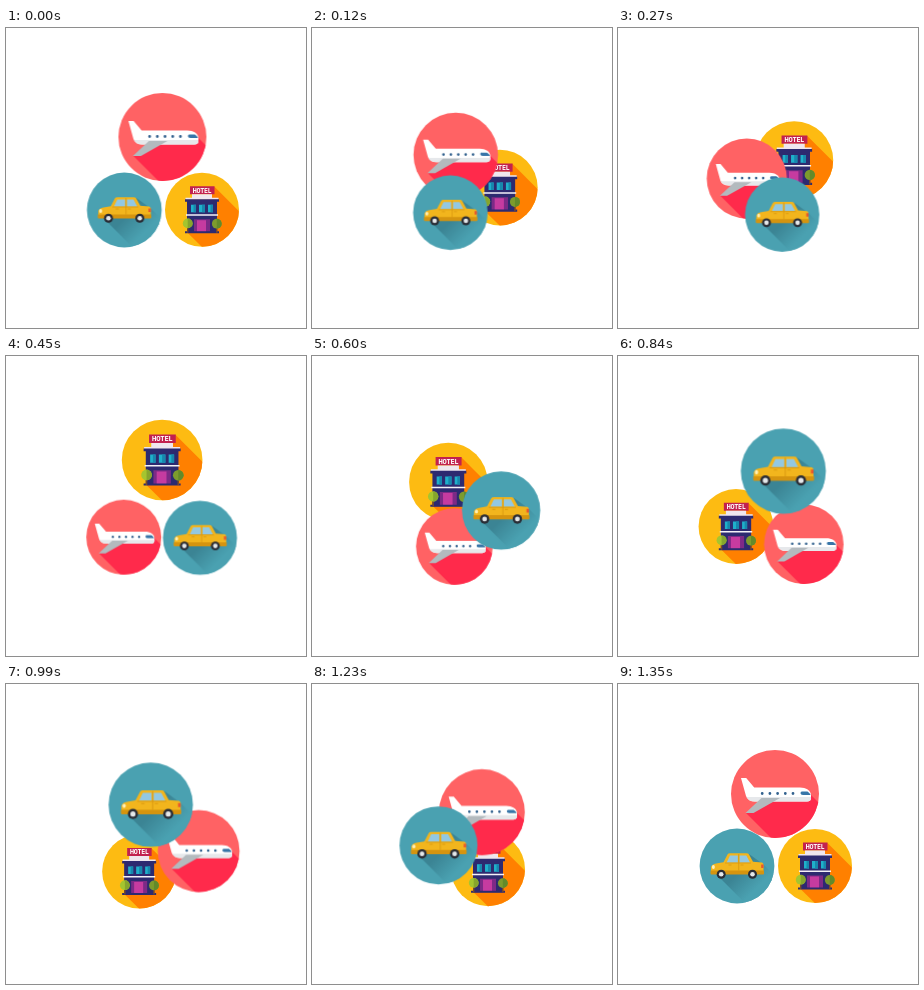
Recreate the animation shown at these times as an HTML page. Size 300 px wide and 300 px high, loop 2.19 s.

```html
<!DOCTYPE html>
<html lang="en">
<head>
<meta charset="utf-8">
<title>Travel icons</title>
<style>
  html, body {
    margin: 0;
    width: 100%;
    height: 100%;
    overflow: hidden;
    background: #fff;
  }
  /* Each icon runs round the triangle on a smooth path, 15 steps per side. */
  .icon {
    position: absolute;
    left: 0;
    top: 0;
    width: 100px;
    height: 100px;
    offset-rotate: 0deg;
    animation: orbit 2190ms steps(15) infinite;
  }
  @keyframes orbit {
    0% { offset-distance: 0%; transform: scale(1); }
    20.547% { offset-distance: var(--d1); transform: scale(var(--s1)); }
    41.095% { offset-distance: var(--d2); transform: scale(var(--s2)); }
    61.643%, 100% { offset-distance: 100%; transform: scale(1); }
  }
  .hotel {
    --d1: 34.2%; --s1: 1.09;
    --d2: 69.1%; --s2: 1;
    offset-path: path("M196 181.7C196 181.7 169.2 104 156.2 104S111.5 169 118.2 182S197 182 197 182");
  }
  .plane {
    --d1: 33.4%; --s1: .852;
    --d2: 66.2%; --s2: .912;
    offset-path: path("M156.4 109C156.4 109 111.25 169.5 118 181.8S189 194.5 195.5 182.5S157 110 157 110");
  }
  .taxi {
    --d1: 31.2%; --s1: .99;
    --d2: 66.2%; --s2: 1.16;
    offset-path: path("M118.3 182C118.3 182 188.1 193.1 194.5 181S168.6 109 156 109S119 182 119 182");
  }
  text {
    font: 700 6.6px "Noto Sans Mono", "DejaVu Sans Mono", monospace;
    letter-spacing: -.2px;
    text-anchor: middle;
    fill: #fff;
  }
</style>
</head>
<body>
<svg class="icon hotel" viewBox="-50 -50 100 100">
  <clipPath id="hotelDisc"><circle r="37"/></clipPath>
  <circle r="37" fill="#fdbb12"/>
  <path clip-path="url(#hotelDisc)" fill="#ff8000" d="M12-23.5L50 14.5V50H13L-14 23.5Z"/>
  <path fill="#c2214f" d="M-12-23.5H12.5V-15.5H-12Z"/>
  <text x=".2" y="-17.1">HOTEL</text>
  <path fill="#efe6ee" d="M-10-15.5H10V-12H16.5V-10H-16.5V-12H-10Z"/>
  <path fill="#2d2a70" d="M-17-10.5H17V-8H15V23H-15V-8H-17Z"/>
  <path fill="#f4f1f7" d="M-16 4.5H16V6H-16Z"/>
  <path fill="#1fb0cb" d="M-11-5h5v7.5h-5zM-3-5h6v7.5h-6zM6-5h5v7.5h-5z"/>
  <path fill="#1787ad" d="M-8.5-5h2.5v7.5h-2.5zM0-5h3v7.5h-3zM8.5-5h2.5v7.5h-2.5z"/>
  <path fill="#7d2a86" d="M-8 9.5H8V22H-8Z"/>
  <path fill="#c63ba0" d="M-5 10.5H4V22H-5Z"/>
  <path fill="#2d2a70" d="M-17 21.5H17V23.5H-17Z"/>
  <path stroke="#7a4a25" stroke-width="1.4" d="M-14.3 15V23M14.8 15V23"/>
  <circle cx="-14.3" cy="13.7" r="4.9" fill="#a5c52f"/>
  <circle cx="14.8" cy="14" r="4.9" fill="#7d9b2d"/>
  <path fill="#86a52d" d="M-14.3 8.8a4.9 4.9 0 0 1 0 9.8z"/>
  <path fill="#638a2a" d="M14.8 9.1a4.9 4.9 0 0 1 0 9.8z"/>
</svg>

<svg class="icon plane" viewBox="-50 -50 100 100">
  <clipPath id="planeDisc"><circle r="44"/></clipPath>
  <circle r="44" fill="#ff6264"/>
  <path clip-path="url(#planeDisc)" fill="#ff2a4b" d="M-29 19L2 50H50V15L34-1L0 4Z"/>
  <g transform="translate(0 -1)">
    <path fill="#fff" d="M-34-15h5.2l8 9.5H25C31-5.5 36-2.5 36 2V5Q36 8.5 32 8.5H-20Q-27 8.5-29 3Z"/>
    <path fill="#e6e8eb" d="M-28.5 4H36V5Q36 8.5 32 8.5H-20Q-26 8.5-28.5 4Z"/>
    <path fill="#b3babe" d="M-13.5 5H5L-21.5 20H-29.5Z"/>
    <path stroke="#33628f" stroke-width="2.8" stroke-linecap="round" stroke-dasharray="0 7.7" d="M-12.8 .5H18.1"/>
    <path fill="#3775a8" d="M27-1.5H32.5Q35 0 35.6 2H28Q25.5 2 25.5 .2T27-1.5Z"/>
  </g>
</svg>

<svg class="icon taxi" viewBox="-50 -50 100 100">
  <clipPath id="taxiDisc"><circle r="37.4"/></clipPath>
  <linearGradient id="fade" gradientUnits="userSpaceOnUse" x1="4" y1="4" x2="21" y2="21">
    <stop stop-color="#3b8494"/>
    <stop offset="1" stop-color="#4aa1b1"/>
  </linearGradient>
  <circle r="37.4" fill="#4aa1b1"/>
  <path clip-path="url(#taxiDisc)" fill="url(#fade)" d="M-19 10L21 50H50V22L26-2L12-12Z"/>
  <path fill="#f2b51d" d="M-26 1Q-25-2-21-2.5L-13.5-3.8L-9.5-11.5Q-8.8-12.8-7-12.8H9.5Q11.2-12.8 12-11.5L16-4.2L25-3.5Q26.5-3 26.5-1V8H-26Z"/>
  <path fill="#d5940f" d="M-26.5 4.5H27V7.5Q27 8.5 26 8.5H-25.5Q-26.5 8.5-26.5 7.5Z"/>
  <path fill="#93c8e2" d="M-10.3-3.6L-7-10.6H.8V-3.6ZM2.6-10.6H9.3L13-3.6H2.6Z"/>
  <path stroke="#d5940f" stroke-width=".7" fill="none" d="M1.7-12V4.5M-12-3H14M3.5-1h3M-8.5-1h3"/>
  <ellipse cx="-23.6" cy="1" rx="1.5" ry="1.9" fill="#fff0b5"/>
  <path fill="#e8562d" d="M24.2-1.5h2.3v3.5h-2.3z"/>
  <g fill="#292c35"><circle cx="-15.8" cy="8.2" r="4.5"/><circle cx="15.5" cy="8.2" r="4.5"/></g>
  <g fill="#e4e7e9"><circle cx="-15.8" cy="8.2" r="2.3"/><circle cx="15.5" cy="8.2" r="2.3"/></g>
</svg>
</body>
</html>
```
